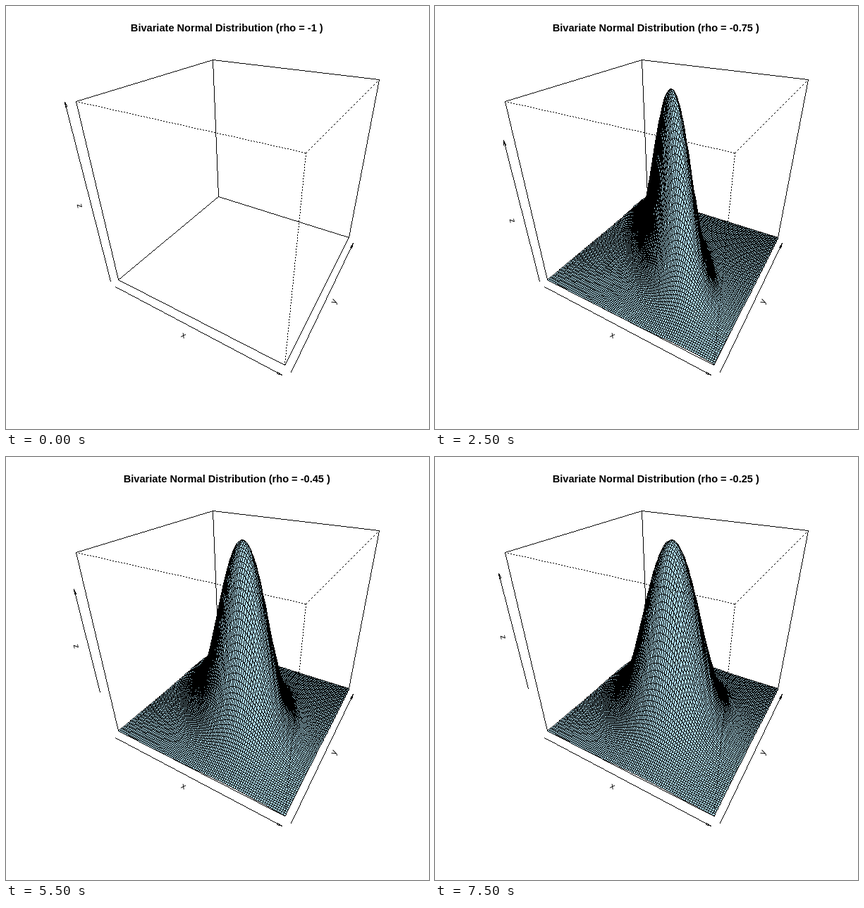
Animation of 600 by 600 pixels, one loop 8 s. Source, as an HTML page with a canvas:

```html
<!DOCTYPE html>
<html lang="en">
<head>
<meta charset="utf-8">
<title>Bivariate Normal Distribution</title>
<style>
html, body { margin: 0; width: 100%; height: 100%; overflow: hidden; background: #fff; }
canvas { display: block; width: 600px; height: 600px; }
</style>
</head>
<body>
<canvas id="stage" width="600" height="600"></canvas>
<script>
const SIZE = 600, STEP_MS = 500, STEPS = 16;
const WHITE = 0xffffffff, BLACK = 0xff000000, BLUE = 0xffe6d8ad; // ABGR
const CELLS = 99, POINTS = CELLS + 1, RANGE = 3;
const FONT = '"Liberation Sans", Arial, sans-serif';

const ctx = document.getElementById('stage').getContext('2d');
const image = ctx.createImageData(SIZE, SIZE);
const pixels = new Uint32Array(image.data.buffer);

// Perspective view of the cube [-1, 1]^3, turned and tilted by 30 degrees.
const SIN = 0.5, COS = Math.sqrt(3) / 2, EYE = 2 + Math.sqrt(3);
const SCALE = 504.007, X0 = 335.495, Y0 = 253.188;

function project(x, y, z) {
  const across = x * COS + y * SIN;
  const near = x * SIN - y * COS;
  const w = EYE - (z * SIN + near * COS);
  return [X0 + SCALE * across / w, Y0 - SCALE * (z * COS - near * SIN) / w, w];
}

function plot(x, y, color) {
  if (x >= 0 && y >= 0 && x < SIZE && y < SIZE) pixels[y * SIZE + x] = color;
}

function line(a, b, dotted) {
  const x = Math.floor(a[0]), y = Math.floor(a[1]);
  const dx = Math.floor(b[0]) - x, dy = Math.floor(b[1]) - y;
  const n = Math.max(Math.abs(dx), Math.abs(dy));
  for (let i = 0; i <= n; i++) {
    if (dotted && i % 4 >= 2) continue;
    const k = n ? i / n : 0;
    plot(Math.round(x + dx * k), Math.round(y + dy * k), BLACK);
  }
}

function fill(quad) {
  const p = quad.map(v => [Math.floor(v[0]), Math.floor(v[1])]);
  const ys = p.map(v => v[1]);
  for (let y = Math.min(...ys), end = Math.max(...ys); y < end; y++) {
    const cuts = [];
    for (let i = 0; i < 4; i++) {
      const a = p[i], b = p[(i + 1) % 4];
      if ((a[1] <= y) !== (b[1] <= y)) {
        cuts.push(a[0] + (y - a[1]) * (b[0] - a[0]) / (b[1] - a[1]));
      }
    }
    cuts.sort((a, b) => a - b);
    for (let i = 0; i + 1 < cuts.length; i += 2) {
      for (let x = Math.ceil(cuts[i]); x <= cuts[i + 1]; x++) plot(x, y, BLUE);
    }
  }
}

function arrow(a, b) {
  line(a, b);
  const back = Math.atan2(a[1] - b[1], a[0] - b[0]);
  for (const turn of [-1, 1]) {
    const t = back + turn * Math.PI / 18;
    line(b, [b[0] + 7.2 * Math.cos(t), b[1] + 7.2 * Math.sin(t)]);
  }
}

const grid = i => -1 + 2 * i / CELLS;

// Facets run from far to near, judged on the ground plane.
const facets = [];
for (let j = 0; j < CELLS; j++) {
  for (let i = 0; i < CELLS; i++) {
    facets.push({ i, j, depth: project(grid(i), grid(j + 1), -1)[2] });
  }
}
facets.sort((a, b) => b.depth - a.depth);

function surface(rho) {
  const height = (x, y) =>
    Math.exp(-RANGE * RANGE * (x * x - 2 * rho * x * y + y * y) / (2 * (1 - rho * rho)));
  const values = [];
  for (let j = 0; j < POINTS; j++) {
    for (let i = 0; i < POINTS; i++) values.push(height(grid(i), grid(j)));
  }
  const peak = Math.max(...values);
  const points = values.map((v, k) =>
    project(grid(k % POINTS), grid(Math.floor(k / POINTS)), 2 * v / peak - 1));
  for (const { i, j } of facets) {
    const k = j * POINTS + i;
    const quad = [points[k], points[k + 1], points[k + 1 + POINTS], points[k + POINTS]];
    fill(quad);
    quad.forEach((p, n) => line(p, quad[(n + 1) % 4]));
  }
}

// Edges that meet the nearest top corner are dotted and lie in front.
function box(front) {
  const corners = [];
  for (let n = 0; n < 8; n++) {
    corners.push(project(n & 1 ? 1 : -1, n & 2 ? 1 : -1, n & 4 ? -1 : 1));
  }
  const nearest = 1;
  for (let n = 0; n < 8; n++) {
    for (const bit of [1, 2, 4]) {
      if (n & bit) continue;
      const m = n | bit;
      if ((n === nearest || m === nearest) === front) line(corners[n], corners[m], front);
    }
  }
}

// Ends of the vertical arrow: the tick values inside the density range.
function zRange(rho) {
  if (rho === -1) return [-1, 1];
  const top = 1 / (2 * Math.PI * Math.sqrt(1 - rho * rho));
  const low = rho < -0.62 ? 0 : 0.05;
  const high = Math.floor(top / 0.05) * 0.05;
  return [2 * low / top - 1, 2 * high / top - 1];
}

function axes(rho) {
  const [low, high] = zRange(rho);
  return [
    { name: 'x', from: -1, to: 1, at: (t, gap) => project(t, -1 - gap, -1 - gap) },
    { name: 'y', from: -1, to: 1, at: (t, gap) => project(1 + gap, t, -1 - gap) },
    { name: 'z', from: low, to: high, at: (t, gap) => project(-1 - gap, -1 - gap, t) }
  ];
}

function label({ name, from, to, at }) {
  const a = at(from, 0.06), b = at(to, 0.06);
  const [x, y] = at((from + to) / 2, 0.12);
  ctx.save();
  ctx.translate(Math.floor(x), Math.floor(y));
  ctx.rotate(Math.atan((b[1] - a[1]) / (b[0] - a[0])));
  ctx.fillText(name, 0, 6);
  ctx.restore();
}

function draw(step) {
  const rho = (step * 5 - 100) / 100;
  const sides = axes(rho);
  pixels.fill(WHITE);
  box(false);
  for (const s of sides) arrow(s.at(s.from, 0.06), s.at(s.to, 0.06));
  if (rho > -1) surface(rho);
  box(true);
  ctx.putImageData(image, 0, 0);

  ctx.fillStyle = '#000';
  ctx.textAlign = 'center';
  ctx.font = 'bold 14.6px ' + FONT;
  ctx.fillText(`Bivariate Normal Distribution (rho = ${rho} )`, 313.3, 36);
  ctx.font = '12px ' + FONT;
  sides.forEach(label);
}

const start = performance.now();
let shown = -1;

function tick() {
  const step = Math.floor((performance.now() - start) / STEP_MS) % STEPS;
  if (step !== shown) draw(shown = step);
  requestAnimationFrame(tick);
}
tick();
</script>
</body>
</html>
```
